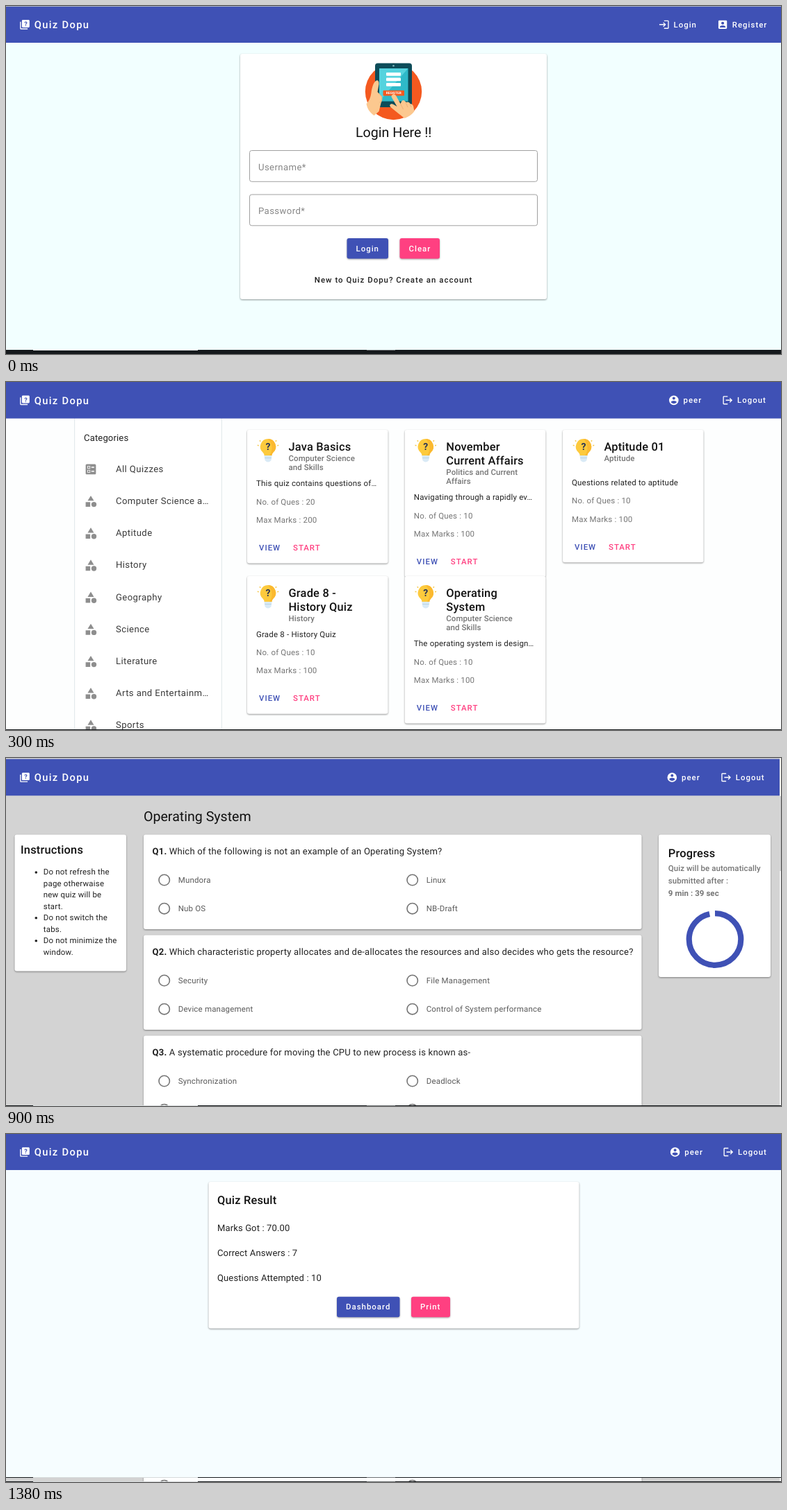
Write an HTML page that moves like this. It is 1115 by 502 pixels and loops after 1.5 s.

```html
<!DOCTYPE html>
<html lang="en">
<head>
<meta charset="utf-8">
<title>Quiz app tour</title>
<style>
  html, body { margin: 0; width: 100%; height: 100%; overflow: hidden; background: #fff; }
  svg { display: block; width: 1115px; height: 502px; }
  text { font-family: Roboto, Arial, sans-serif; white-space: pre; text-rendering: geometricPrecision; }
  .bold { font-weight: 700; }
  .card { fill: #fff; filter: drop-shadow(0 1px .9px rgba(0, 0, 0, .42)); }
  .button { filter: drop-shadow(0 1.4px 1.1px rgba(0, 0, 0, .35)); }
</style>
</head>
<body>
<svg id="stage" viewBox="0 0 1115 502"></svg>
<script>
const W = 1115, H = 502, STEP = 300;
const BLUE = '#3f51b5', PINK = '#ff4081', GREY = '#757575', INK = '#212121';
const APP = 'Quiz Dopu', MEMBER = 'peer';

// size, letter spacing, weight
const TYPE = {
  brand: [14.76, 1.3, 500],
  button: [11.4, 1.02, 500],
  heading: [19.6, 0, 400],
  title: [16.4, .2, 500],
  sub: [11.46, .08, 500],
  body: [11.48, .2, 400],
  lead: [13.05, .2, 400],
  plain: [13, .13, 400],
  item: [13.12, .41, 400],
  group: [13.12, .12, 400],
};

const ICON = {
  quiz: 'M4 6H2v14c0 1.1.9 2 2 2h14v-2H4zM20 2H8c-1.1 0-2 .9-2 2v12c0 1.1.9 2 2 2h12c1.1 0 2-.9 2-2V4c0-1.1-.9-2-2-2z',
  login: 'M11 7 9.6 8.4l2.6 2.6H2v2h10.2l-2.6 2.6L11 17l5-5zM20 19h-8v2h8c1.1 0 2-.9 2-2V5c0-1.1-.9-2-2-2h-8v2h8z',
  register: 'M3 5v14c0 1.1.9 2 2 2h14c1.1 0 2-.9 2-2V5c0-1.1-.9-2-2-2H5c-1.1 0-2 .9-2 2zm12 4a3 3 0 1 1-6 0 3 3 0 0 1 6 0zM6 17c0-2 4-3.1 6-3.1s6 1.1 6 3.1v1H6z',
  account: 'M12 2a10 10 0 1 0 0 20 10 10 0 0 0 0-20zm0 3a3 3 0 1 1 0 6 3 3 0 0 1 0-6zm0 14.2c-2.5 0-4.7-1.3-6-3.2 0-2 4-3.1 6-3.1s6 1.1 6 3.1c-1.3 1.9-3.5 3.2-6 3.2z',
  logout: 'M17 7l-1.4 1.4 2.6 2.6H8v2h10.2l-2.6 2.6L17 17l5-5zM4 5h8V3H4c-1.1 0-2 .9-2 2v14c0 1.1.9 2 2 2h8v-2H4z',
  ballot: 'M13 9.5h5v-2h-5zM13 16.5h5v-2h-5zM19 21H5c-1.1 0-2-.9-2-2V5c0-1.1.9-2 2-2h14c1.1 0 2 .9 2 2v14c0 1.1-.9 2-2 2zM6 11h5V6H6zM7 7h3v3H7zM6 18h5v-5H6zM7 14h3v3H7z',
  shapes: 'M12 2 6.5 11h11zM3 13.5h8v8H3zM17.5 13a4.5 4.5 0 1 0 0 9 4.5 4.5 0 0 0 0-9z',
};

const rect = (x, y, w, h, fill, r = 0, more = '') =>
  `<rect x="${x}" y="${y}" width="${w}" height="${h}" rx="${r}" fill="${fill}" ${more}/>`;
const circle = (x, y, r, fill, more = '') =>
  `<circle cx="${x}" cy="${y}" r="${r}" fill="${fill}" ${more}/>`;
const path = (d, fill, more = '') => `<path d="${d}" fill="${fill}" ${more}/>`;
const card = (x, y, w, h) => rect(x, y, w, h, '#fff', 3, 'class="card"');

// y is the middle of the capitals
function text(x, y, str, type = 'body', fill = INK) {
  const [size, gap, weight] = TYPE[type];
  const inner = str.replace(/<b>/g, '<tspan class="bold">').replace(/<\/b>/g, '</tspan>');
  return `<text x="${x}" y="${(y + size * .355).toFixed(2)}" font-size="${size}" ` +
    `letter-spacing="${gap}" font-weight="${weight}" fill="${fill}">${inner}</text>`;
}

const icon = (name, cx, cy, size, fill) =>
  `<g transform="translate(${cx - size / 2} ${cy - size / 2}) scale(${size / 24})">` +
  path(ICON[name], fill, 'fill-rule="evenodd"') + '</g>';

const button = (x, y, w, label, fill) =>
  rect(x, y, w, 29.5, fill, 3, 'class="button"') + text(x + 13, y + 14.5, label, 'button', '#fff');

const link = (name, x, y, label) =>
  icon(name, x - 13.7, y, 16.4, '#fff') + text(x, y, label, 'button', '#fff');

function header(y, top, bottom, links, width = W) {
  return rect(0, top, width, bottom - top, BLUE) +
    icon('quiz', 27, y, 16.4, '#fff') +
    `<text x="28.4" y="${y + 2.4}" font-size="9" font-weight="700" text-anchor="middle" fill="${BLUE}">?</text>` +
    text(40.8, y, APP, 'brand', '#fff') +
    links.map(([name, x, label]) => link(name, x, y, label)).join('');
}
const memberLinks = (a, b) => [['account', a, MEMBER], ['logout', b, 'Logout']];

// sliver of the desktop under the page
const edge = (y, h) => rect(0, y, W, h, '#15191c') +
  rect(39, y, 237, 1, '#d6dadb') + rect(519, y, 41, 1, '#6d7173');

function bullets(x, y, step, lines, isFirst = () => true) {
  return lines.map((line, i) => text(x, y + i * step, line) +
    (isFirst(i) ? circle(x - 10.5, y + i * step + .7, 1.8, INK) : '')).join('');
}

function tablet() {
  const skin = '#fcc88f', shade = '#eeb077';
  return circle(557.5, 123.5, 40.7, '#f4591f') +
    rect(531, 82.5, 53, 63.5, '#0d4c59', 4) +
    rect(537, 90, 41.5, 47.5, '#2fb9c9') +
    path('M537 90H578.5L537 137.5z', '#55d3de') +
    circle(557.5, 86.3, 1.3, '#7fb4bc') +
    [96, 103.5, 111].map(y => rect(547, y, 21, 4.8, '#fff', 1)).join('') +
    rect(542.5, 121.8, 30.5, 7.6, '#f4591f', 1) +
    '<text x="557.7" y="127.3" font-size="4.8" font-weight="700" text-anchor="middle" fill="#fff">REGISTER</text>' +
    path('M532 108c3-2 5 1 4.500 5l-2 11 5 5c3 3 2 7 0 11l-3 12-7 6c-7-5-10-11-11-17 4-4 6-9 7-16 1-8 3-14 6.500-17z', skin) +
    path('M534 124l5 5c3 3 1 8-1 11', 'none', `stroke="${shade}"`) +
    path('M555 129c2-3 5-2 6.500 1l6 11 2-4c2-2 4-1 5 1l2 1c2-1 4 0 5 2 3 0 5 3 5 6l1 5c-4 5-9 8-14 10l-9-7-11-9c-3-3 0-6 4-4l5 3-7.500-13c-.7-1.300-.5-2.500 0-3z', skin) +
    path('M567.500 141l4 8M575 139l3 7M581 141l2 5', 'none', `stroke="${shade}"`);
}

function bulb(x, y) {
  const rays = [-80, -52, 52, 80].map(a =>
    `<path d="M0-13.500V-15.500" transform="rotate(${a})" stroke="#f6c94c" stroke-width="1.500"/>`).join('');
  return `<g transform="translate(${x} ${y})">${rays}` +
    path('M-5.500 12h11l-1 7q-4.500 5-9 0z', '#d9eaf6') +
    path('M-4.800 15.500h9.600', 'none', 'stroke="#b9d3e6"') +
    path('M0-12a11.300 11.300 0 0 1 7.500 19.600q-2 2-2 4.400h-11q0-2.400-2-4.400A11.300 11.300 0 0 1 0-12z', '#fdca3d') +
    path('M0-12a11.300 11.300 0 0 1 7.500 19.600q-2 2-2 4.400H2q8-12-2-24z', '#fbb92f') +
    '<text y="4.300" font-size="14" font-weight="700" text-anchor="middle" fill="#2c3554">?</text></g>';
}

function sidebar(y) {
  const names = ['All Quizzes', 'Computer Science a…', 'Aptitude', 'History', 'Geography',
    'Science', 'Literature', 'Arts and Entertainm…', 'Sports'];
  return rect(98.500, 52, 212, 450, '#fff') +
    rect(98, 52, 1.200, 450, '#e3eaec') + rect(309.700, 52, 1.200, 450, '#e3eaec') +
    text(112, y, 'Categories', 'group') +
    names.map((name, i) => {
      const cy = y + 44.800 + i * 46.200;
      return icon(i ? 'shapes' : 'ballot', 122, cy + .7, 19.700, '#8e8e8e') + text(158, cy, name, 'item', '#3a3a3a');
    }).join('');
}

function quizCard(x, top, titles, subs, about, count) {
  const subY = top + 24 + (titles.length - 1) * 20 + 16.500;
  const y = Math.max(subY + (subs.length - 1) * 13.800 + 23, top + 76);
  return card(x, top, 202.500, y + 115.200 - top) + bulb(x + 30, top + 25) +
    titles.map((s, i) => text(x + 59.500, top + 24 + i * 20, s, 'title', '#111')).join('') +
    subs.map((s, i) => text(x + 59.500, subY + i * 13.800, s, 'sub', GREY)).join('') +
    text(x + 13, y, about) +
    text(x + 13, y + 26.400, `No. of Ques : ${count}`, 'body', GREY) +
    text(x + 13, y + 52.800, `Max Marks : ${count * 10}`, 'body', GREY) +
    text(x + 17, y + 92.800, 'VIEW', 'button', BLUE) +
    text(x + 66, y + 92.800, 'START', 'button', PINK);
}

function question(n, top, ask, options) {
  return card(198, top, 716.500, 136.500) + text(210.500, top + 24, `<b>Q${n}.</b> ${ask}`, 'lead') +
    options.map((label, i) => {
      const x = i % 2 ? 584.700 : 227.700, y = top + 65.500 + (i >> 1) * 41.200;
      return circle(x, y, 7.700, 'none', `stroke="${GREY}" stroke-width="1.600"`) +
        text(x + 20, y - .5, label, 'body', '#5a5a5a');
    }).join('');
}

function loginPage() {
  const field = (y, label) =>
    rect(350.500, y, 414, 44.800, '#fff', 3, 'stroke="#a0a0a0"') + text(363, y + 23.500, label, 'item', '#868686');
  return rect(0, 0, W, H, '#f2ffff') +
    header(26.800, .8, 53, [['login', 960.500, 'Login'], ['register', 1044.800, 'Register']]) +
    rect(0, 0, W, .8, '#a9aeb8') +
    card(337, 69, 441, 354) + tablet() +
    text(503, 182, 'Login Here !!', 'heading', '#111') +
    field(208.500, 'Username*') + field(272, 'Password*') +
    button(490.500, 335, 59.500, 'Login', BLUE) + button(566.500, 335, 57.500, 'Clear', PINK) +
    text(443.800, 395, `New to ${APP}? Create an account`, 'button') +
    edge(496, 6);
}

function listPage() {
  return rect(0, 0, W, H, '#fdfefe') + sidebar(80.400) +
    quizCard(347, 69, ['Java Basics'], ['Computer Science', 'and Skills'], 'This quiz contains questions of…', 20) +
    quizCard(573.800, 69, ['November', 'Current Affairs'], ['Politics and Current', 'Affairs'], 'Navigating through a rapidly ev…', 10) +
    quizCard(801, 69, ['Aptitude 01'], ['Aptitude'], 'Questions related to aptitude', 10) +
    quizCard(347, 280, ['Grade 8 -', 'History Quiz'], ['History'], 'Grade 8 - History Quiz', 10) +
    quizCard(573.800, 280, ['Operating', 'System'], ['Computer Science', 'and Skills'], 'The operating system is design…', 10) +
    header(26.300, 0, 52.600, memberLinks(974.500, 1052)) +
    rect(0, 501, W, 1, '#15191c');
}

function introPage() {
  return rect(0, 0, W, H, '#fdfefe') + sidebar(80) +
    card(347, 40, 657, 393.500) +
    text(359.800, 79.500, 'Quiz Instructions', 'title', '#111') +
    text(363, 119, 'Operating System', 'title', GREY) +
    text(363, 154, 'The operating system is designed in such a way that it can manage the overall resources and operations of the computer.', 'sub', GREY) +
    text(359.800, 201, 'Welcome to the quiz! Please read the following instructions before you start:', 'lead') +
    bullets(393, 233.700, 16.500, [
      'Answer all the questions.',
      'Each question has only one correct answer.',
      'Scroll down to move to the next question.',
      'You have to submit the quiz with in <b>10 minutes.</b>',
      'You can attempt the quiz any number of time.',
      'There are <b>10 questions</b> in this quiz.',
      'Each question carries <b>10 marks</b>. No negative marking for the wrong answers.',
      'Click <b>Start Quiz</b> button to start the quiz.',
      "Once you've answered all the questions, click <b>'Submit'</b> to see your score.",
    ]) +
    button(631, 397.300, 87.500, 'Start Quiz', BLUE) +
    header(26.300, 0, 52.600, memberLinks(973.500, 1051.200), 1114) +
    edge(500.500, 1.500);
}

function quizPage() {
  const r = 37.300, turn = 2 * Math.PI * r, left = (9 * 60 + 39) / 600;
  return rect(0, 0, W, H, '#d3d3d3') +
    header(28, 1.500, 54.300, memberLinks(972, 1049.800), 1113) +
    rect(1113, 0, 2, H, '#f1f1f1') + rect(1113.500, 55, 1.500, 108, '#c4c4c4') +
    text(198, 84.500, 'Operating System', 'heading', '#111') +
    card(12.500, 110.500, 160.500, 197) +
    text(21, 132.300, 'Instructions', 'title', '#111') +
    bullets(53.800, 164.300, 16.450, ['Do not refresh the', 'page otherwaise', 'new quiz will be', 'start.',
      'Do not switch the', 'tabs.', 'Do not minimize the', 'window.'], i => [0, 4, 6].includes(i)) +
    question(1, 110.500, 'Which of the following is not an example of an Operating System?',
      ['Mundora', 'Linux', 'Nub OS', 'NB-Draft']) +
    question(2, 255.500, 'Which characteristic property allocates and de-allocates the resources and also decides who gets the resource?',
      ['Security', 'File Management', 'Device management', 'Control of System performance']) +
    question(3, 400.500, 'A systematic procedure for moving the CPU to new process is known as-',
      ['Synchronization', 'Deadlock', '', '']) +
    card(939, 110.500, 161, 205.500) +
    text(952.800, 137, 'Progress', 'title', '#111') +
    text(952.800, 158.500, 'Quiz will be automatically', 'sub', GREY) +
    text(952.800, 176.500, 'submitted after :', 'sub', GREY) +
    text(952.800, 195, '<b>9 min : 39 sec</b>', 'sub', GREY) +
    circle(1020, 261.500, r, 'none', `stroke="${BLUE}" stroke-width="8.200" ` +
      `stroke-dasharray="${turn * left} ${turn}" transform="rotate(-90 1020 261.500)"`) +
    edge(501, 1);
}

function resultPage() {
  return quizPage() + rect(0, 0, W, 496, '#f6fdff') +
    header(26, 0, 52, memberLinks(976.300, 1053)) +
    card(291.500, 69, 533, 211.500) +
    text(304, 95, 'Quiz Result', 'title', '#111') +
    text(304, 135, 'Marks Got : 70.00', 'plain') +
    text(304, 171, 'Correct Answers : 7', 'plain') +
    text(304, 207, 'Questions Attempted : 10', 'plain') +
    button(476, 234.800, 90.500, 'Dashboard', BLUE) + button(583, 234.800, 56, 'Print', PINK) +
    edge(495, 1);
}

const pages = [loginPage, listPage, introPage, quizPage, resultPage];
const stage = document.getElementById('stage');
stage.innerHTML = pages.map(page => `<g display="none">${page()}</g>`).join('');
const layers = [...stage.children];

let shown = -1;
function draw(ms) {
  const next = Math.floor(ms / STEP) % layers.length;
  if (next === shown) return;
  layers.forEach((layer, i) => layer.setAttribute('display', i === next ? 'inline' : 'none'));
  shown = next;
}

const start = performance.now();
function tick() {
  draw(performance.now() - start);
  requestAnimationFrame(tick);
}
tick();
</script>
</body>
</html>
```
